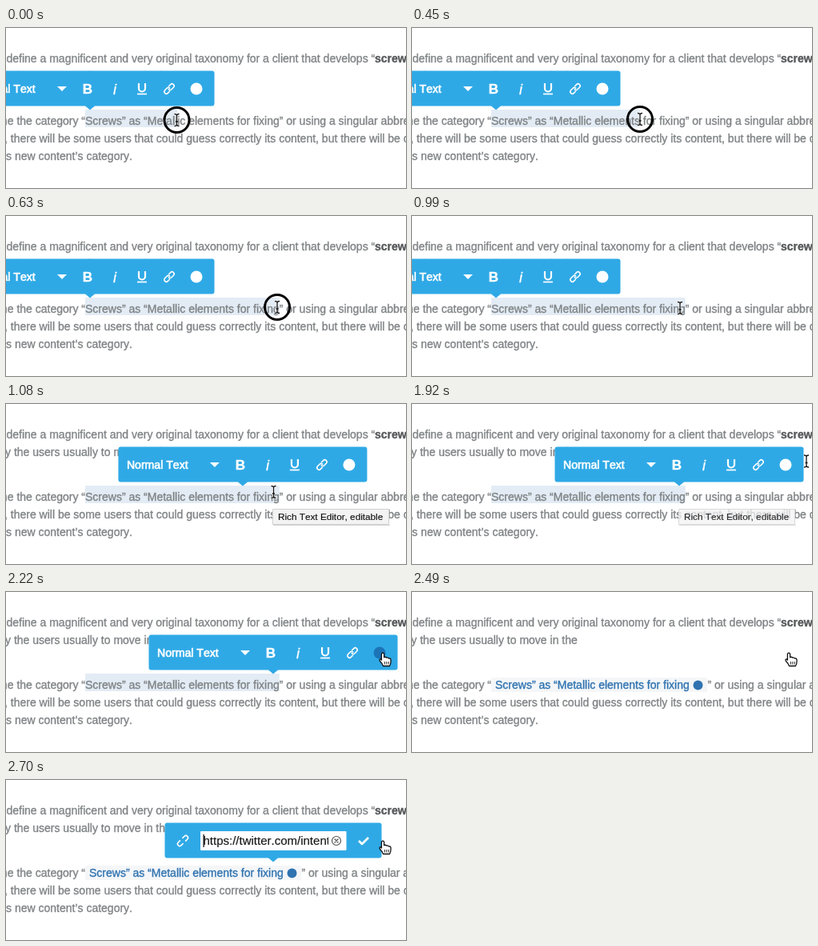
These frames come from a looping animation (500x200 px, 4700 ms). An HTML page with a canvas:

```html
<!DOCTYPE html>
<html lang="en">
<head>
<meta charset="utf-8">
<title>Text toolbar</title>
<style>
html, body { margin: 0; width: 100%; height: 100%; overflow: hidden; background: #fff; }
canvas { display: block; width: 500px; height: 200px; }
</style>
</head>
<body>
<canvas id="stage"></canvas>
<script>
const LOOP = 4700, STEP = 30;
const FAMILY = '"Liberation Sans", Arial, sans-serif';
const BLUE = '#2fa9e6', DARK_BLUE = '#1c74b6', GRAY = '#7f8385', LINK = '#2f73b0';
const PHRASE = 'Screws” as “Metallic elements for fixing';
const SEL_X = 99, LINK_TIME = 2490, PRESS_END = 720;

// time, x, y of the pointer centre
const PATH = [
  [0, 213.5, 115], [450, 285, 114], [540, 312, 114], [630, 339, 114],
  [780, 335, 115], [990, 335, 115], [1050, 334.5, 110], [1470, 334.5, 110],
  [1920, 493, 71.5], [1980, 494, 69], [2040, 496, 54], [2130, 483, 70],
  [2220, 474, 84], [LOOP, 474, 84]
];

const canvas = document.getElementById('stage');
const ratio = window.devicePixelRatio || 1;
canvas.width = 500 * ratio;
canvas.height = 200 * ratio;
const ctx = canvas.getContext('2d');
ctx.scale(ratio, ratio);

const clamp = v => Math.max(0, Math.min(1, v));
const easeOut = p => 1 - (1 - clamp(p)) ** 3;

function pointerAt(t) {
  const i = PATH.findIndex(k => k[0] > t);
  const [t0, x0, y0] = PATH[i - 1], [t1, x1, y1] = PATH[i];
  const p = (t - t0) / (t1 - t0);
  return { x: x0 + (x1 - x0) * p, y: y0 + (y1 - y0) * p };
}

function setFont(size, style = '') {
  ctx.font = `${style} ${size}px ${FAMILY}`;
  ctx.fontKerning = 'none';
}

// A hairline outline gives the letters a slightly heavier weight
function text(str, x, y, { color = GRAY, size = 14, style = '', align = 'left', weight = 0.35 } = {}) {
  setFont(size, style);
  ctx.textAlign = align;
  ctx.fillStyle = ctx.strokeStyle = color;
  ctx.lineWidth = weight;
  ctx.lineJoin = 'round';
  ctx.fillText(str, x, y);
  ctx.strokeText(str, x, y);
}

function dot(x, y, r, color) {
  ctx.beginPath();
  ctx.arc(x, y, r, 0, Math.PI * 2);
  ctx.fillStyle = color;
  ctx.fill();
}

function box(x, y, w, h, r, color) {
  ctx.beginPath();
  ctx.roundRect(x, y, w, h, r);
  ctx.fillStyle = color;
  ctx.fill();
}

function stroke(d, color, width) {
  ctx.strokeStyle = color;
  ctx.lineWidth = width;
  ctx.stroke(new Path2D(d));
}

function at(x, y, draw) {
  ctx.save();
  ctx.translate(x, y);
  draw();
  ctx.restore();
}

// Right edge of the selection, snapped to whole letters
function selectionEnd(x) {
  setFont(14);
  let end = SEL_X;
  for (let n = 1; n <= PHRASE.length; n++) {
    const next = SEL_X + ctx.measureText(PHRASE.slice(0, n)).width;
    if ((end + next) / 2 > x) break;
    end = next;
  }
  return end;
}

function drawPage(t) {
  text('define a magnificent and very original taxonomy for a client that develops “', 0.5, 43);
  text('screw', 461, 43, { color: '#555859', style: 'bold' });
  text('y the users usually to move in the', -1, 65);

  const linked = t >= LINK_TIME;
  if (linked) {
    box(SEL_X, 107, 270, 18, 2, '#f4f6f8');
  } else {
    const end = selectionEnd(t < 630 ? pointerAt(t).x : 400);
    box(SEL_X, 102, end - SEL_X, 22, 0, '#e3ecf5');
  }
  text('me the category “', SEL_X, 121, { align: 'right' });
  text(PHRASE, SEL_X + (linked ? 5 : 0), 121, { color: linked ? LINK : GRAY });
  if (linked) dot(357.5, 116.5, 6, LINK);
  text('” or using a singular abbre', linked ? 369.5 : 341.7, 121);

  text(', there will be some users that could guess correctly its content, but there will be c', -2, 143);
  text('s new content’s category.', 0, 165);
}

function drawPanel(left, width) {
  const mid = left + width / 2;
  box(left - 0.5, 53.5, width + 1, 44, 3, BLUE);
  ctx.beginPath();
  ctx.moveTo(mid - 6.5, 97);
  ctx.lineTo(mid + 6.5, 97);
  ctx.lineTo(mid, 102.5);
  ctx.fill();
}

function chain(x, color, joined) {
  const half = joined ? 'M-2 2.6H-5A2.6 2.6 0 0 1-5-2.6H-1.5A2.6 2.6 0 0 1 1 0'
                      : 'M-2.5 2.6H-5.5A2.6 2.6 0 0 1-5.5-2.6H-2.5';
  at(x, 76, () => {
    ctx.rotate(-Math.PI / 4);
    ctx.lineCap = 'round';
    stroke(half, color, 1.6);
    ctx.rotate(Math.PI);
    stroke(half, color, 1.6);
  });
}

function drawToolbar(left, pointer) {
  drawPanel(left, 310);
  text('Normal Text', left + 10, 81, { color: '#fff', size: 14.1, weight: 0.6 });
  at(left + 120, 76, () => {
    ctx.fillStyle = '#fff';
    ctx.fill(new Path2D('M-6-3H6L0 3Z'));
  });

  const tint = x => pointer && Math.abs(pointer.x - left - x) < 17 ? DARK_BLUE : '#fff';
  text('B', left + 152, 82, { color: tint(152), size: 17, style: 'bold', align: 'center' });
  text('i', left + 186, 82.5, { color: tint(186), size: 18, style: 'italic', align: 'center' });
  at(left + 220, 76, () => {
    stroke('M-4-7V-.5A4 4 0 0 0 4-.5V-7', tint(220), 2.2);
    stroke('M-6 6.5H6', tint(220), 1.7);
  });
  chain(left + 254, tint(254), true);
  dot(left + 288, 76, 7.5, tint(288));
}

function drawLinkBar(left) {
  drawPanel(left, 270);
  chain(left + 22, '#fff', false);
  box(left + 44, 64, 182.5, 24, 1, '#fff');
  ctx.save();
  ctx.beginPath();
  ctx.rect(left + 44, 64, 160, 24);
  ctx.clip();
  text('https://twitter.com/intent/', left + 47.5, 81, { color: '#1a1a1a', size: 15, weight: 0.2 });
  ctx.restore();
  box(left + 47.5, 68, 1.2, 16, 0, '#000');
  at(left + 214, 76, () => {
    ctx.lineCap = 'round';
    stroke('M5.5 0A5.5 5.5 0 1 1-5.5 0A5.5 5.5 0 1 1 5.5 0', '#555', 1.2);
    stroke('M-2-2L2 2M2-2L-2 2', '#555', 1.4);
  });
  at(left + 248, 76, () => stroke('M-6 0L-2 4L6-4', '#fff', 2.6));
}

function drawTooltip(alpha) {
  ctx.save();
  ctx.globalAlpha = alpha;
  box(333, 131, 146, 20, 0, '#f3f3f4');
  stroke('M333.5 131.5H478.5V150.5H333.5Z', '#d0d0d0', 1);
  stroke('M334 151.5H480', 'rgba(0,0,0,.18)', 1);
  ctx.globalAlpha = Math.sqrt(alpha);
  text('Rich Text Editor, editable', 340, 145, { color: '#111', size: 11.75, weight: 0.15 });
  ctx.restore();
}

function drawRing(x, y, alpha) {
  ctx.save();
  ctx.globalAlpha = alpha;
  ctx.beginPath();
  ctx.arc(x, y, 15.5, 0, Math.PI * 2);
  ctx.strokeStyle = '#000';
  ctx.lineWidth = 3;
  ctx.stroke();
  ctx.restore();
}

function drawBeam() {
  const d = 'M-3-7.5Q0-7.5 0-5.5Q0-7.5 3-7.5M0-5.5V5.5M-3 7.5Q0 7.5 0 5.5Q0 7.5 3 7.5M-1.5 2H1.5';
  stroke(d, 'rgba(255,255,255,.8)', 3);
  stroke(d, '#111', 1.3);
}

function drawHand() {
  const d = 'M-4.6-6.6Q-3-9-1.4-6.6V-2.2Q.3-3.4 1.6-1.8Q3.3-2.8 4.4-1Q6.6-1.6 7 .6V3Q7 6 5.5 8.5' +
    'H-2.5Q-4 5-6.8 2Q-7.6-.6-5.4 0L-4.6 1Z';
  ctx.fillStyle = '#fff';
  ctx.fill(new Path2D(d));
  ctx.lineJoin = 'round';
  stroke(d, '#111', 1.3);
  stroke('M-.6 3V6.5M1.8 3V6.5M4.2 3V6.5', '#111', 0.9);
}

function draw(t) {
  const p = pointerAt(t);
  ctx.fillStyle = '#fff';
  ctx.fillRect(0, 0, 500, 200);
  drawPage(t);

  const inBar = t > 1470 && p.y < 97 && p.y > 54 && p.x < 489;
  if (t < LINK_TIME) {
    drawToolbar(-50 + 229 * easeOut((t - 990) / 200), inBar && p);
  } else if (t >= 2550) {
    drawLinkBar(-30 + 229 * easeOut((t - 2525) / 175));
  }

  const tip = t < 1050 ? 0 : 1 - clamp((t - 1850) / 280);
  if (tip > 0) drawTooltip(tip);

  if (t < PRESS_END + 90) drawRing(p.x, p.y, 1 - clamp((t - PRESS_END) / 90));
  if (t >= 2340 && t < 2490) drawRing(470, 80, 1 - clamp((t - 2400) / 90));

  at(p.x, p.y, inBar ? drawHand : drawBeam);
}

const start = performance.now();
function tick() {
  const t = (performance.now() - start) % LOOP;
  draw(Math.floor(t / STEP) * STEP);
  requestAnimationFrame(tick);
}
tick();
</script>
</body>
</html>
```
